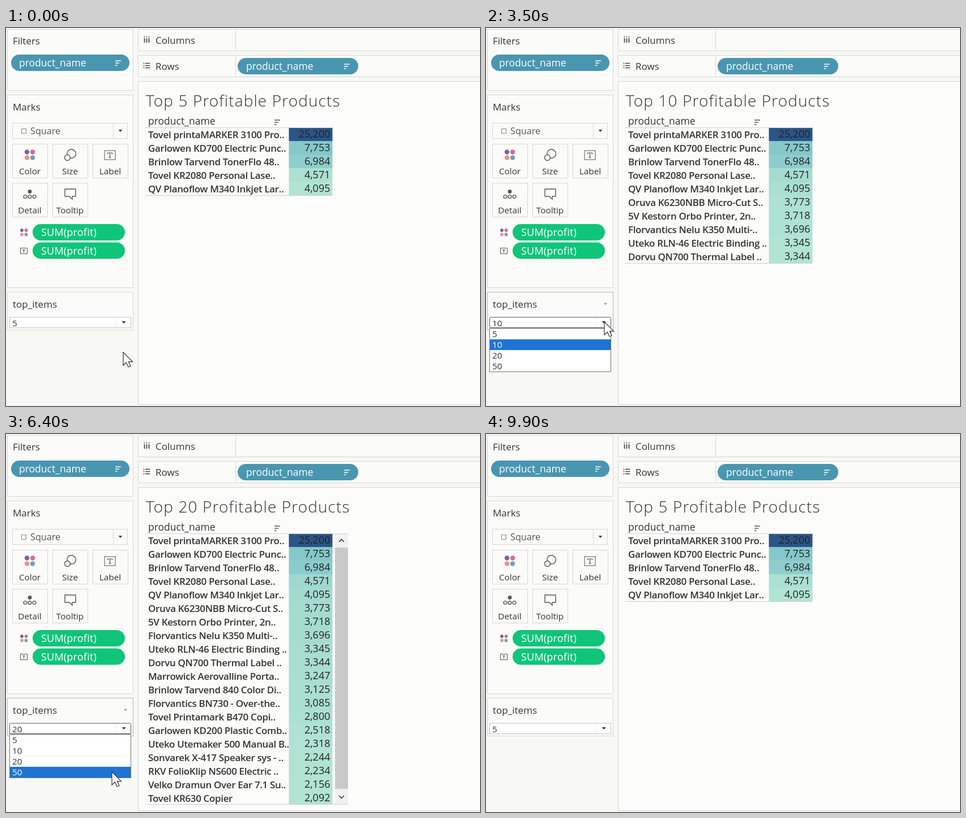
These frames come from a looping animation (837x669 px, 10 s). An HTML page:

```html
<!DOCTYPE html>
<html lang="en">
<head>
<meta charset="utf-8">
<title>Top N products</title>
<style>
  html, body { margin: 0; width: 100%; height: 100%; overflow: hidden; background: #f8f8f5; }
  svg { display: block; width: 837px; height: 669px; }
  text { font-family: "Open Sans", "Noto Sans", sans-serif; font-size: 17px; fill: #333; white-space: pre; }
  .title { font-size: 28px; font-weight: 300; letter-spacing: 1.1px; }
  .field { font-size: 17.5px; }
  .pill { fill: #fff; }
  .sum { font-size: 18px; letter-spacing: .2px; fill: #fff; }
  .small { font-size: 15.3px; }
  .pick { font-size: 16.2px; fill: #555; }
  .name { font-weight: 600; letter-spacing: -.35px; fill: #333; }
  .num { font-size: 18px; text-anchor: end; fill: #222; }
  .mid { text-anchor: middle; }
</style>
</head>
<body>
<svg viewBox="0 0 837 669">
  <g id="still"></g>
  <g id="live"></g>
  <path id="cursor" d="M0 0V23L5.3 18L9 26L13 24.2L9.4 16.6H16.5Z" fill="#fff" stroke="#333" stroke-width="1.2"/>
</svg>
<script>
const LOOP = 10000, STEP = 100, TOP = 176, ROW = 24;
const EDGE = '#d6d6d2', INK = '#555';

const names = [
  'Tovel printaMARKER 3100 Pro..', 'Garlowen KD700 Electric Punc..',
  'Brinlow Tarvend TonerFlo 48..', 'Tovel KR2080 Personal Lase..',
  'QV Planoflow M340 Inkjet Lar..', 'Oruva K6230NBB Micro-Cut S..',
  '5V Kestorn Orbo Printer, 2n..', 'Florvantics Nelu K350 Multi-..',
  'Uteko RLN-46 Electric Binding ..', 'Dorvu QN700 Thermal Label ..',
  'Marrowick Aerovalline Porta..', 'Brinlow Tarvend 840 Color Di..',
  'Florvantics BN730 - Over-the..', 'Tovel Printamark B470 Copi..',
  'Garlowen KD200 Plastic Comb..', 'Uteko Utemaker 500 Manual B..',
  'Sonvarek X-417 Speaker sys - ..', 'RKV FolioKlip NS600 Electric ..',
  'Velko Dramun Over Ear 7.1 Su..', 'Tovel KR630 Copier'
];
const profits = [25200, 7753, 6984, 4571, 4095, 3773, 3718, 3696, 3345, 3344,
  3247, 3125, 3085, 2800, 2518, 2318, 2244, 2234, 2156, 2092];
const choices = [5, 10, 20, 50];

// scale: number of rows that set the colour range; pale: bottom of the half-painted part
const views = [
  { t: 0, title: 5, rows: 5, scale: 5, done: true },
  { t: 2300, title: 10, rows: 10, scale: 5, pale: 359 },
  { t: 2600, title: 10, rows: 10, scale: 10, done: true },
  { t: 4300, title: 20, rows: 20, scale: 10, pale: 480, thumb: 628 },
  { t: 4600, title: 20, rows: 20, scale: 20, thumb: 628, done: true },
  { t: 6700, title: 50, rows: 20, scale: 20, thumb: 366, done: true },
  { t: 8600, title: 50, rows: 5, scale: 20, done: true, open: true },
  { t: 8800, title: 5, rows: 5, scale: 5, done: true }
];
const picks = [[0, 5], [2000, 10], [4100, 20], [6500, 50], [8400, 5]];
const menus = [[1100, 2000], [3400, 4100], [5700, 6500], [7600, 8400]];
const hovers = [[700, 2000], [3200, 4200], [5300, 6600], [7300, 8800]];
const path = [
  [0, 207, 574], [200, 207, 574], [900, 209, 520], [1200, 209, 520], [1800, 165, 558],
  [2800, 165, 558], [3300, 209, 520], [3500, 209, 520], [4000, 174, 584], [4700, 174, 584],
  [5400, 213, 516], [5800, 213, 516], [6300, 187, 598], [6700, 187, 598], [7200, 187, 533],
  [7500, 209, 520], [7700, 209, 520], [8200, 164, 543], [9000, 164, 543], [9600, 150, 680]
];

const rect = (x, y, w, h, fill, stroke = 'none', rx = 0) =>
  `<rect x="${x}" y="${y}" width="${w}" height="${h}" rx="${rx}" fill="${fill}" stroke="${stroke}"/>`;
const box = (x, y, w, h, stroke = EDGE, fill = '#fbfbf9') => rect(x + .5, y + .5, w, h, fill, stroke);
const text = (x, y, s, cls = '') => `<text x="${x}" y="${y}" class="${cls}">${s}</text>`;
const line = (d, stroke = INK, w = 1) => `<path d="${d}" fill="none" stroke="${stroke}" stroke-width="${w}"/>`;
const dot = (x, y, r, fill, stroke = 'none') =>
  `<circle cx="${x}" cy="${y}" r="${r}" fill="${fill}" stroke="${stroke}" stroke-width="1.4"/>`;
const caret = (x, y, fill = '#444', s = 3.5) => `<path d="M${x - s} ${y - 2}h${2 * s}l${-s} ${s + .5}z" fill="${fill}"/>`;
const sortIcon = (x, y, c) => line(`M${x} ${y}h10M${x} ${y + 4}h7M${x} ${y + 8}h3.5`, c, 1.6);
const dots = (x, y, gap, r) => ['#7c6592', '#e5648d', '#e9918a', '#6c9fc5']
  .map((c, i) => dot(x + i % 2 * gap, y + (i >> 1) * gap, r, c)).join('');
const inside = (spans, t) => spans.some(([a, b]) => t >= a && t < b);
const latest = (list, t, key) => list.filter(e => e[key] <= t).pop();

// Light green at the smallest value, teal at the second largest, dark blue at the top
function shade(value, min) {
  const light = [178, 228, 211], teal = [132, 200, 202], dark = [43, 84, 135];
  const [from, to, a, b] = value > profits[1]
    ? [teal, dark, profits[1], profits[0]] : [light, teal, min, profits[1]];
  const k = (value - a) / (b - a);
  return `rgb(${from.map((c, i) => Math.round(c + (to[i] - c) * k))})`;
}

function drawStill() {
  let s = box(2, 2, 222, 108) + box(2, 118, 222, 341)
    + box(233, 2, 620, 38) + box(233, 48, 620, 38) + box(233, 94, 620, 572, EDGE, '#fcfcfb')
    + line('M405.5 3V40M405.5 49V86', EDGE);

  s += text(12, 29, 'Filters') + text(12, 146, 'Marks') + text(264, 28, 'Columns') + text(264, 74, 'Rows');
  s += line('M244.5 18v8M248.5 18v8M252.5 18v8M244.5 15v1.6M248.5 15v1.6M252.5 15v1.6', '#444', 1.7);
  s += line('M246 62.5h8.5M246 66.5h8.5M246 70.5h8.5M242.5 62.5h2M242.5 66.5h2M242.5 70.5h2', '#444', 1.6);
  s += rect(9, 47, 209, 29, '#4996b0', 'none', 14.5) + text(23, 68, 'product_name', 'field pill') + sortIcon(193, 58, '#fff');
  s += rect(409, 53, 213, 29, '#4996b0', 'none', 14.5) + text(424, 74, 'product_name', 'field pill') + sortIcon(597, 64, '#fff');

  s += box(11, 168, 203, 27) + line('M189.5 169V195', EDGE) + box(27, 178, 8, 8, '#888')
    + text(43, 187.5, 'Square', 'pick') + caret(202, 182);
  ['Color', 'Size', 'Label', 'Detail', 'Tooltip'].forEach((label, i) => {
    const x = [11, 82, 153][i % 3], y = i < 3 ? 205 : 274;
    s += box(x, y, 62, 60) + text(x + 31, y + 53.5, label, 'small mid');
  });
  s += dots(37, 219.5, 10, 4.2);
  s += dot(115.5, 222.5, 7.8, 'none', INK) + dot(108.5, 229.5, 5, '#fbfbf9', INK);
  s += rect(174, 217, 19, 16, 'none', INK) + line('M179.5 223v-2h8v2M183.5 221v8.5M181.5 229.5h4', INK, 1.2);
  s += dot(42, 289.5, 3.4, INK);
  for (const x of [34, 42, 50]) s += dot(x, 298.5, 2.9, 'none', INK);
  s += line('M104 285h19v13h-6v5l-5-5h-8z', INK, 1.4);

  for (const y of [347, 379.5])
    s += rect(47, y, 163, 29, '#0fc57a', 'none', 14.5) + text(62, y + 21, 'SUM(profit)', 'sum');
  s += dots(28, 358, 7.5, 2.9);
  s += rect(25.5, 389.5, 12, 10, 'none', INK) + line('M29 392.5h5M31.5 392.5v5', INK, 1.2);
  return s;
}

function drawTable(v) {
  const bottom = TOP + v.rows * ROW;
  const painted = v.done ? v.rows : v.scale;
  let s = text(247, 139, `Top ${v.title} Profitable Products`, 'title')
    + text(251, 171, 'product_name', 'field') + sortIcon(474, 163, '#555');
  for (let i = 0; i < v.rows; i++) {
    const y = TOP + i * ROW;
    if (i < painted) s += rect(499.5, y, 77, ROW, shade(profits[i], profits[v.scale - 1]));
    s += text(251, y + 18.5, names[i], 'name');
    if (v.done) s += text(572.5, y + 18, profits[i].toLocaleString('en-US'), 'num');
  }
  if (v.pale) {
    const y = TOP + painted * ROW;
    s += rect(499.5, y, 77, v.pale - y, '#def4ee');
  }
  const right = v.thumb ? 604 : 576;
  if (v.done) s += line(`M246 176.5H${right}`, '#cfcfcf');
  else s += line('M246 176.5H499', '#ececec');
  if (v.done && !v.open) s += line(`M246 ${bottom - (v.thumb ? .5 : -.5)}H${right}`, '#cfcfcf');
  if (v.thumb)
    s += rect(581, 177, 23, 478, '#f1f1f3') + rect(581, 201, 23, v.thumb - 201, '#c9c9ca')
      + line('M588 191l4.5-4.5 4.5 4.5M588 640l4.5 4.5 4.5-4.5', '#444', 1.7);
  return s;
}

function drawPicker(t, cy) {
  const hover = inside(hovers, t), focus = t >= 1000 && t < 9200;
  const value = latest(picks, t, 0)[1];
  let s = box(2, 467, 222, 67, hover ? '#b4b4b4' : EDGE) + text(12, 495, 'top_items');
  if (hover) s += caret(211, 488.5, '#aaa');
  s += rect(6.5, 512, 214, 18.5, '#fff', focus ? '#555' : '#c4c4c4', focus ? 1.5 : 0)
    + line('M195.5 513V530', '#ececec') + text(11, 527.5, value, 'small') + caret(208, 521, '#333');
  if (inside(menus, t)) {
    const over = Math.floor((cy - 532) / 19);
    const lit = over >= 0 ? over : choices.indexOf(value);
    s += box(6, 531, 214, 77, '#777', '#fff');
    choices.forEach((n, i) => {
      const y = 532 + i * 19;
      if (i === lit) s += rect(7, y, 213, 19, '#1e74d2');
      s += text(11, y + 15, n, i === lit ? 'small pill' : 'small');
    });
  }
  return s;
}

function cursorAt(t) {
  const i = path.findIndex(p => p[0] > t);
  if (i < 0) return path[path.length - 1].slice(1);
  const [t0, x0, y0] = path[i - 1], [t1, x1, y1] = path[i];
  const k = (t - t0) / (t1 - t0), e = k * k * (3 - 2 * k);
  return [x0 + (x1 - x0) * e, y0 + (y1 - y0) * e];
}

const live = document.getElementById('live');
const cursor = document.getElementById('cursor');
document.getElementById('still').innerHTML = drawStill();

const start = performance.now();
let shown = -1;
function tick() {
  const t = Math.floor((performance.now() - start) % LOOP / STEP) * STEP;
  if (t !== shown) {
    shown = t;
    const [x, y] = cursorAt(t);
    live.innerHTML = drawTable(latest(views, t, 't')) + drawPicker(t, y);
    cursor.setAttribute('transform', `translate(${x.toFixed(1)} ${y.toFixed(1)})`);
  }
  requestAnimationFrame(tick);
}
tick();
</script>
</body>
</html>
```
